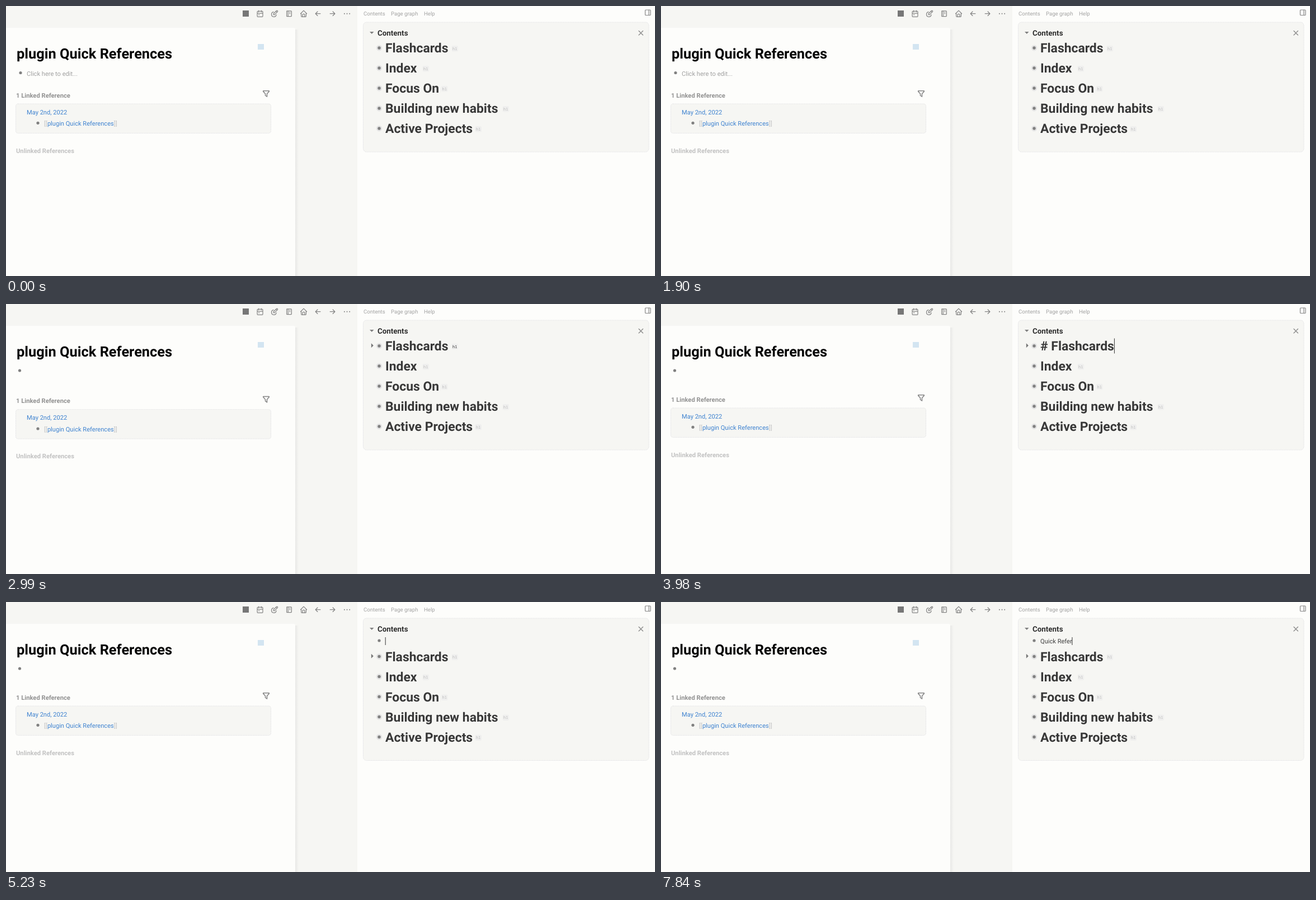
Animation, 1160 px wide and 483 px high, one loop 7.99 s. Source, as an HTML page:

```html
<!DOCTYPE html>
<html lang="en">
<head>
<meta charset="utf-8">
<title>Notes</title>
<style>
  html, body { margin: 0; width: 100%; height: 100%; overflow: hidden; background: #fdfdfb; }
  svg { display: block; width: 1160px; height: 483px; }
  text { font: 11.1px Roboto, "Open Sans", sans-serif; text-rendering: geometricPrecision; white-space: pre; }
  .icon { fill: none; stroke: #858585; stroke-width: 2; stroke-linecap: round; stroke-linejoin: round; }
  .card { fill: #f6f6f3; stroke: #e4e4e6; stroke-dasharray: 2 1; }
  .menu { font-size: 9.6px; fill: #a3a3a3; }
  .title { font-size: 25.4px; font-weight: 700; fill: #050505; }
  .label { font-size: 11.2px; font-weight: 700; fill: #929292; }
  .head { font-size: 22.9px; font-weight: 700; fill: #383838; }
  .name { font-size: 13.4px; font-weight: 700; fill: #303030; }
  .muted { fill: #a0a0a0; }
  .link { fill: #3f83d0; }
  .bracket { fill: #c2c2c2; }
  .tag { font: 7px "Noto Sans Mono", "DejaVu Sans Mono", monospace; fill: #bcbcbc; }
  .dot { fill: #808080; }
  .halo { fill: #e4e4e4; }
</style>
</head>
<body>
<svg viewBox="0 0 1160 483">
  <defs>
    <linearGradient id="shade">
      <stop offset="0" stop-color="#e6e6e4"/>
      <stop offset="1" stop-color="#f6f6f3"/>
    </linearGradient>
  </defs>
  <rect width="628" height="483" fill="#f6f6f3"/>
  <rect x="628" width="532" height="483" fill="#fdfdfb"/>
  <rect x="516" y="42" width="7" height="441" fill="url(#shade)"/>
  <path d="M0 39H514a3 3 0 0 1 3 3V483H0z" fill="#fdfdfb"/>

  <rect x="423" y="8" width="11" height="11" fill="#777"/>
  <g id="toolbar" class="icon"></g>

  <text class="title" x="19" y="93.5">plugin Quick References</text>
  <rect x="450" y="68" width="11" height="10" fill="#d3e5f1"/>
  <circle id="leftDot" class="dot" r="2.6"/>
  <text id="hint" class="muted" x="37" y="124.5">Click here to edit...</text>

  <g id="refs">
    <text class="label" x="18" y="163.5">1 Linked Reference</text>
    <path class="icon" transform="translate(456 148) scale(.75)"
      d="M5.5 5h13a1 1 0 0 1 .5 1.5L14 12v7l-4-3v-4L5 6.5A1 1 0 0 1 5.5 5"/>
    <rect class="card" x="17.5" y="175" width="456" height="52.5" rx="4"/>
    <text class="link" x="37" y="193.7">May 2nd, 2022</text>
    <circle class="dot" cx="57" cy="209.3" r="2.6"/>
    <text x="68" y="214.3"><tspan class="bracket">[[</tspan><tspan class="link">plugin Quick References</tspan><tspan class="bracket">]]</tspan></text>
    <text class="label" x="18" y="262.7" style="fill:#c2c2c2">Unlinked References</text>
  </g>

  <text class="menu" x="639" y="16.5">Contents</text>
  <text class="menu" x="688" y="16.5">Page graph</text>
  <text class="menu" x="747" y="16.5">Help</text>

  <rect id="panel" class="card" x="638.5" y="29" width="510.5" height="232" rx="6"/>
  <g class="icon" style="stroke-width:1.2">
    <rect x="1142.5" y="7" width="9.5" height="9.5" rx="1"/>
    <path d="M1149 7v9.5"/>
    <path d="M1131 44.5l7.5 7.5m0-7.5l-7.5 7.5"/>
  </g>
  <path d="M650 46h7.5l-3.75 4z" fill="#808080"/>
  <text class="name" x="664" y="53">Contents</text>
  <g id="newBlock">
    <circle class="dot" cx="667" cy="69" r="2.6"/>
    <text id="typed" x="678" y="74" fill="#404040"></text>
  </g>
  <g id="list"><path id="arrow" d="M652.8 70.3l4 4-4 4z" fill="#777"/></g>
  <rect id="caret" width="1" fill="#333"/>
</svg>
<script>
const LOOP = 7990;
const $ = id => document.getElementById(id);

const icons = [
  [454, "M6 5h12a2 2 0 0 1 2 2v12a2 2 0 0 1-2 2H6a2 2 0 0 1-2-2V7a2 2 0 0 1 2-2M16 3v4M8 3v4M4 11h16M8 15h2"],
  [480, "M12 15l8.4-8.4a2.1 2.1 0 0 0-3-3L9 12v3h3zM16 5l3 3M9 7.1a7 7 0 1 0 8 8"],
  [506, "M6 4h11a2 2 0 0 1 2 2v12a2 2 0 0 1-2 2H6a1 1 0 0 1-1-1V5a1 1 0 0 1 1-1M9 4v16M13 8h2M13 12h2"],
  [532, "M5 12H3l9-9 9 9h-2M5 12v7a2 2 0 0 0 2 2h10a2 2 0 0 0 2-2v-7M9 21v-6a2 2 0 0 1 2-2h2a2 2 0 0 1 2 2v6"],
  [557.5, "M5 12h14M5 12l6 6M5 12l6-6"],
  [583.5, "M5 12h14M19 12l-6 6M19 12l-6-6"],
  [609.5, "M4 11.5h1v1h-1zM11.5 11.5h1v1h-1zM19 11.5h1v1h-1z"]
];
$("toolbar").innerHTML = icons.map(([x, d]) =>
  `<path transform="translate(${x - 7.4} 6.3) scale(.62)" d="${d}"/>`).join("");

// Heading text and the left edge of its level tag
const heads = [["Flashcards", 798], ["Index", 746], ["Focus On", 779.5],
  ["Building new habits", 889], ["Active Projects", 840]];
$("list").insertAdjacentHTML("beforeend", heads.map(([name, x], i) => `
  <g transform="translate(0 ${i * 36})">
    <circle class="halo" cx="667" cy="75" r="5.2"/>
    <circle class="dot" cx="667" cy="75" r="2.7"/>
    <text class="head" x="678" y="83">${name}</text>
    <g><rect x="${x - 1.5}" y="71" width="11.5" height="10.5" rx="2" fill="#efefee"/>
    <text class="tag" x="${x}" y="78.7">h1</text></g>
  </g>`).join(""));
const first = document.querySelector(".head");
const tag = document.querySelector(".tag");

const phrase = "Quick Refer";
const keys = [6200, 6350, 6460, 6620, 6880, 7240, 7390, 7570, 7660, 7750, 7840];

const show = (el, on) => el.setAttribute("visibility", on ? "visible" : "hidden");
const move = (el, y) => el.setAttribute("transform", `translate(0 ${y})`);
const set = (el, attrs) => { for (const k in attrs) el.setAttribute(k, attrs[k]); };
const write = (el, s) => { if (el.textContent !== s) el.textContent = s; };

function draw(t) {
  const editing = t >= 2360, heading = t >= 3950 && t < 5230, added = t >= 5230;

  show($("hint"), !editing);
  set($("leftDot"), editing ? { cx: 24.5, cy: 119 } : { cx: 26, cy: 119.5 });
  move($("refs"), !editing ? 0 : t >= 2390 && t < 3950 ? 13.7 : 11);

  // Hovering the first heading brings up its tag and fold arrow
  const hover = Math.max(0, Math.min(1, (Math.floor((t - 2850) / 46.6) + 1) / 4));
  const lit = t < 3950 ? hover : 0;
  const grey = Math.round(188 - 145 * lit);
  tag.style.fill = `rgb(${grey},${grey},${grey})`;
  $("arrow").setAttribute("opacity", hover);
  show(tag.parentNode, !heading);
  write(first, heading ? "# Flashcards" : "Flashcards");

  const drop = added ? 22.5 : 0;
  move($("list"), drop);
  $("panel").setAttribute("height", 232 + drop);

  show($("newBlock"), added);
  write($("typed"), phrase.slice(0, keys.filter(k => t >= k).length));
  show($("caret"), heading || added);
  if (added) {
    set($("caret"), { x: 677.7 + $("typed").getComputedTextLength(), y: 63, height: 14 });
  } else if (heading) {
    const x = t < 4590 ? 678 + first.getComputedTextLength() : 677.5;
    set($("caret"), { x, y: 61.5, height: 27 });
  }
}

const start = performance.now();
function tick() {
  draw((performance.now() - start) % LOOP);
  requestAnimationFrame(tick);
}
tick();
</script>
</body>
</html>
```
